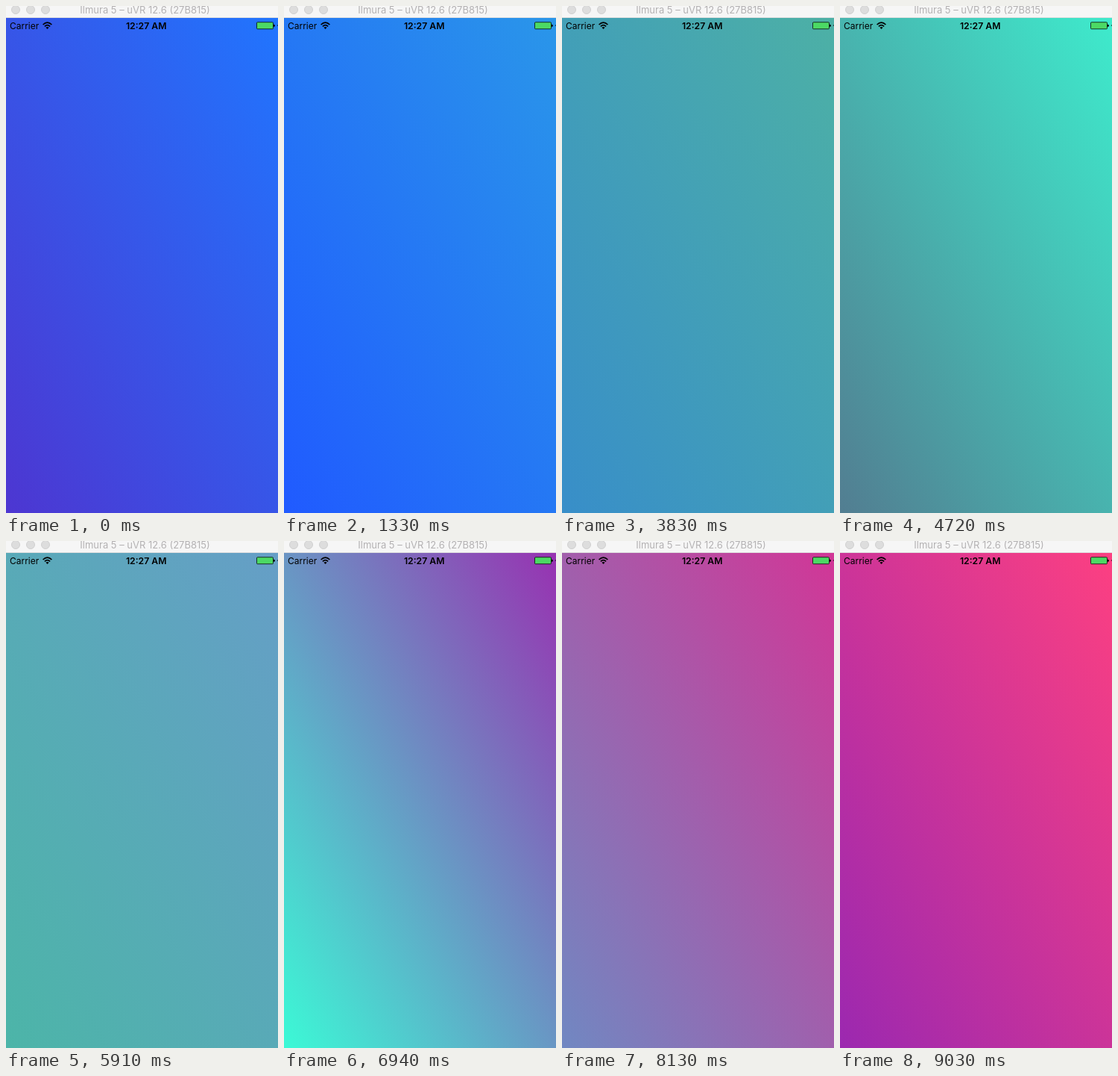
An HTML page that plays this animation: 365 by 679 pixels, repeating every 9.32 s.

```html
<!DOCTYPE html>
<html lang="en">
<head>
<meta charset="utf-8">
<title>Drifting gradient</title>
<style>
  html, body { margin: 0; width: 100%; height: 100%; overflow: hidden; }
  body { position: relative; background: #f6f6f6; }
  #screen { position: absolute; left: 0; top: 16px; width: 375px; height: 667px; }
  svg { position: absolute; left: 0; top: 0; }
  text { font: 12px Inter, sans-serif; }
  .title { font-size: 13px; fill: #b4b2b3; text-anchor: middle; }
  .clock { font-size: 12.2px; font-weight: 600; text-anchor: middle; }
</style>
</head>
<body>
<div id="screen"></div>
<svg width="365" height="679">
  <!-- window title bar -->
  <rect width="365" height="16" fill="#f6f6f6"/>
  <rect y="15" width="365" height="1" fill="#dedede"/>
  <g fill="#ddd" stroke="#d0d0d0">
    <circle cx="13" cy="5" r="5.5"/>
    <circle cx="33" cy="5" r="5.5"/>
    <circle cx="53" cy="5" r="5.5"/>
  </g>
  <text class="title" x="186.5" y="10">Ilmura 5 – uVR 12.6 (27B815)</text>

  <!-- status bar -->
  <text x="5" y="31">Carrier</text>
  <g fill="none" stroke="#000" stroke-width="1.7">
    <path d="M49.6 25 Q55.5 19.4 61.4 25"/>
    <path d="M51.9 27.3 Q55.5 24 59.1 27.3"/>
  </g>
  <path d="M53.4 28.8 Q55.5 27 57.6 28.8 L55.5 31 Z"/>
  <text class="clock" x="188.2" y="31">12:27 AM</text>
  <rect x="336.5" y="21.75" width="22" height="9" rx="1" fill="#4cd964" stroke="#000" stroke-width=".75"/>
  <path d="M359 24.7 h.8 q1 0 1 1.5 t-1 1.5 h-.8 Z"/>
  <path d="M363.5 26.5 L367 23 V26.5 Z"/>
</svg>
<script>
  const LOOP = 9320;
  const TICK = 147;            // ms between picture updates
  const PHASE_PER_MS = 1 / 2000;
  const START_PHASE = 0.51;
  const COLORS = [0x7b1fa2, 0x204cff, 0x209eff, 0x5a787f, 0x3affd9, 0x9c27b0, 0xff4081];
  const screen = document.getElementById('screen');

  const channels = color => [color >> 16, color >> 8 & 255, color & 255];

  // Whole phases are palette colours; fractions blend to the next one.
  function colorAt(phase) {
    const index = Math.floor(phase);
    const from = channels(COLORS[index % COLORS.length]);
    const to = channels(COLORS[(index + 1) % COLORS.length]);
    const mixed = from.map((v, i) => Math.round(v + (to[i] - v) * (phase - index)));
    return `rgb(${mixed})`;
  }

  function draw() {
    const time = performance.now() % LOOP;
    const phase = START_PHASE + Math.floor(time / TICK) * TICK * PHASE_PER_MS;
    screen.style.background =
      `linear-gradient(to top right, ${colorAt(phase)}, ${colorAt(phase + 1)})`;
    requestAnimationFrame(draw);
  }
  draw();
</script>
</body>
</html>
```
